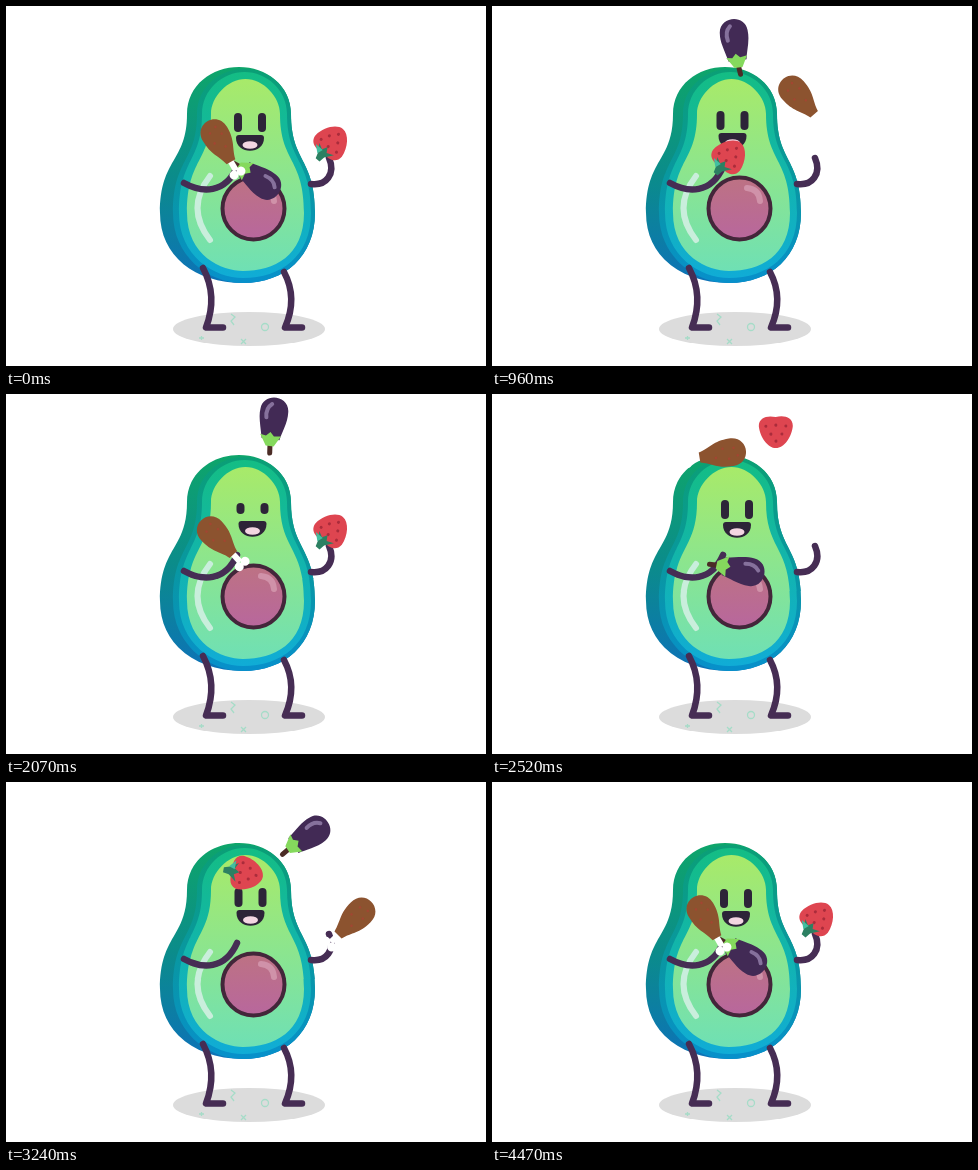
Write an HTML page that moves like this. It is 480x360 px and loops after 4500 ms.

```html
<!DOCTYPE html>
<html>
<head>
<meta charset="utf-8">
<style>
  html, body { margin: 0; width: 100%; height: 100%; overflow: hidden; background: #fff; }
  svg { display: block; width: 100vw; height: 100vh; }
  .limb { fill: none; stroke: #462d54; stroke-width: 6.5; stroke-linecap: round; stroke-linejoin: round; }
</style>
</head>
<body>
<svg viewBox="0 0 480 360">
  <defs>
    <linearGradient id="skin" x2="0" y2="1"><stop stop-color="#0ea56a"/><stop offset=".5" stop-color="#0b8c8a"/><stop offset="1" stop-color="#0d72b8"/></linearGradient>
    <linearGradient id="edge" x2="0" y2="1"><stop stop-color="#0b9f75"/><stop offset="1" stop-color="#0790cb"/></linearGradient>
    <linearGradient id="rind" x2="0" y2="1"><stop stop-color="#14bd84"/><stop offset="1" stop-color="#10acd6"/></linearGradient>
    <linearGradient id="flesh" x2="0" y2="1"><stop stop-color="#a8ea69"/><stop offset="1" stop-color="#6fe0b4"/></linearGradient>
    <linearGradient id="pit" x2="0" y2="1"><stop stop-color="#bd7283"/><stop offset="1" stop-color="#b8679d"/></linearGradient>
  </defs>

  <ellipse cx="243" cy="323" rx="76" ry="17" fill="#dcdcdc"/>
  <g fill="none" stroke="#a6dcc8" stroke-width="1.3">
    <path d="M225 308l4 3-4 4 3 4M235 333l5 5m0-5l-5 5M193 332h5m-2.5-2v4"/>
    <circle cx="259" cy="321" r="3.5"/>
  </g>

  <g id="body"></g>
  <path d="M204 170Q179 202 204 234" fill="none" stroke="#c9eedc" stroke-width="6" stroke-linecap="round"/>
  <circle cx="247.5" cy="202.5" r="31" fill="url(#pit)" stroke="#43263a" stroke-width="4"/>
  <path d="M255 182Q267 183 268 195" fill="none" stroke="#d092a9" stroke-width="6" stroke-linecap="round"/>

  <g id="face" fill="#2d2438">
    <rect class="eye" x="228" width="8" rx="4"/>
    <rect class="eye" x="252" width="8" rx="4"/>
    <path d="M230 132Q230 129 233 129H255Q258 129 258 132C258 149 230 149 230 132Z"/>
    <ellipse cx="244" cy="139" rx="7.5" ry="3.8" fill="#f3d6e2"/>
  </g>

  <path class="limb" d="M197 262Q212 290 200 321.5H217M278 266Q292 292 279 321.5H296"/>
  <path class="limb" d="M178 177C196 187 219 188 231 161M305 178C320 180 330 168 323 152"/>

  <g id="eggplant">
    <path d="M-32 1L-22 0" stroke="#4b2c26" stroke-width="5" stroke-linecap="round"/>
    <path d="M-18-9C-5-12 3-15 11-14C28-13 28 13 11 14C0 15-10 10-18 9Z" fill="#422a55"/>
    <path d="M-25-4L-14-11-15-5-11-1-15 3-14 10-25 4Z" fill="#85d95d"/>
    <path d="M3-7Q12-9 17-3" fill="none" stroke="#86719c" stroke-width="4" stroke-linecap="round"/>
  </g>
  <g id="drumstick">
    <path d="M-23 0H-34" stroke="#fff" stroke-width="6"/>
    <circle cx="-37" cy="-4" r="4.5" fill="#fff"/><circle cx="-37" cy="4" r="4.5" fill="#fff"/>
    <path d="M-24-5C-12-8-8-14 8-14C28-14 28 14 8 14C-8 14-12 8-24 5Z" fill="#8c532f"/>
    <path d="M-8 3h.1M0-5h.1M5 6h.1M11-4h.1M14 4h.1" stroke="#a24632" stroke-width="2.5" stroke-linecap="round"/>
  </g>
  <g id="strawberry">
    <path d="M-14 0C-16-8-14-17-5-17C6-16 17-8 17 0C17 8 6 16-5 17C-14 17-16 8-14 0Z" fill="#de4550"/>
    <path d="M-5-10h.1M-6 0h.1M-5 10h.1M3-6h.1M3 5h.1M10 0h.1" stroke="#aa2c3b" stroke-width="3" stroke-linecap="round"/>
    <g id="leaf">
      <path d="M-9-9L-12-3-7 0-12 3-9 10-17 4-23 3V-2L-17-4Z" fill="#2c8062"/>
      <path d="M-12-2L-12-11-18-4Z" fill="#42bfa0"/>
    </g>
  </g>
</svg>
<script>
const LOOP = 4500;
const $ = id => document.getElementById(id);

// Pear outline from its belly sides, neck sides, top and bottom.
function pear(left, neckL, neckR, right, top, bottom, fill) {
  const mid = (neckL + neckR) / 2, k = (neckR - neckL) * .26;
  $('body').insertAdjacentHTML('beforeend', `<path fill="url(#${fill})" d="M${mid} ${top}
    C${mid + k} ${top} ${neckR} ${top + 18} ${neckR} 108 C${neckR} 156 ${right} 152 ${right} 207
    C${right} 250 ${right - 30} ${bottom} 237 ${bottom} C${left + 35} ${bottom} ${left} 250 ${left} 207
    C${left} 152 ${neckL} 156 ${neckL} 108 C${neckL} ${top + 18} ${mid - k} ${top} ${mid} ${top}Z"/>`);
}
pear(154, 181, 285, 309, 61, 277, 'skin');
pear(167, 191, 285, 309, 63, 277, 'edge');
pear(173, 196, 281, 305, 66, 272, 'rind');
pear(181, 205, 274, 298, 73, 265, 'flesh');

// Poses are [x, y, angle]; tracks are [time, pose, height of the arc to the next key].
const drumL = [213, 135, -120], drumR = [349, 136, 315];
const berryL = [238, 150, -410], berryR = [326, 136, -50];
const eggL = [253, 174, 35], eggUp = [236, 140, -105], eggR = [327, 122, 0];
const eggRise = [328, 76, 12], eggTop = [267, 27, -83];

const tracks = {
  drumstick: [
    [0, drumL], [440, drumL, 80], [960, [306, 90, 228], 4], [1110, drumR],
    [1350, drumR, 108], [2010, drumL], [2070, [211, 143, -133]], [2200, drumL],
    [2377, drumL, 5], [2520, [231, 60, -10], 70], [3047, drumR], [3280, drumR, 97],
    [3960, [228, 100, -75], 2], [4020, drumL], [LOOP, drumL]],
  strawberry: [
    [0, berryR], [340, berryR, 103], [930, berryL], [1180, berryL, 108], [1850, berryR],
    [2200, berryR, 24], [2520, [284, 37, -270], 24], [2850, berryL], [3110, berryL, 5],
    [3240, [240, 92, -350], 78], [3800, berryR], [LOOP, berryR]],
  eggplant: [
    [0, eggL], [560, eggL], [730, eggUp, 12], [960, [243, 37, -98], 56], [1430, eggR],
    [1760, eggR, 5], [1840, eggRise, 22], [2070, eggTop, 24], [2270, eggL],
    [2520, [249, 176, 12]], [2600, [249, 176, 12]], [2720, eggUp, 70],
    [3240, [302, 53, -35], 3], [3380, eggR], [3860, eggR, 5], [3960, eggRise, 16],
    [4130, eggTop, 24], [4310, eggL], [LOOP, eggL]]
};
const lean = [[0, [0, 0]], [500, [0, 0]], [960, [-3.5, -2]], [1500, [0, 0]], [2070, [2.5, -2]],
  [2520, [1, -1]], [3240, [.5, -1]], [3960, [0, 0]], [LOOP, [0, 0]]];

function sample(track, t) {
  const i = track.findIndex(key => key[0] > t);
  const [t0, from, lift = 0] = track[i - 1], [t1, to] = track[i];
  const u = (t - t0) / (t1 - t0);
  const pose = from.map((v, n) => v + (to[n] - v) * u);
  pose[1] -= 4 * lift * u * (1 - u);
  return pose;
}

function draw(now) {
  const t = now % LOOP;
  for (const id in tracks) {
    const [x, y, angle] = sample(tracks[id], t);
    $(id).setAttribute('transform', `translate(${x} ${y}) rotate(${angle})`);
    if (id === 'strawberry')
      $('leaf').style.display = Math.sin(angle * Math.PI / 180) > .8 ? 'none' : '';
  }
  $('face').setAttribute('transform', `translate(${sample(lean, t)})`);
  const height = 19 - 8 * Math.max(0, 1 - Math.abs(t - 2070) / 90);
  document.querySelectorAll('.eye').forEach(eye => {
    eye.setAttribute('y', 116.5 - height / 2);
    eye.setAttribute('height', height);
  });
  requestAnimationFrame(() => draw(performance.now()));
}
draw(0);
</script>
</body>
</html>
```
